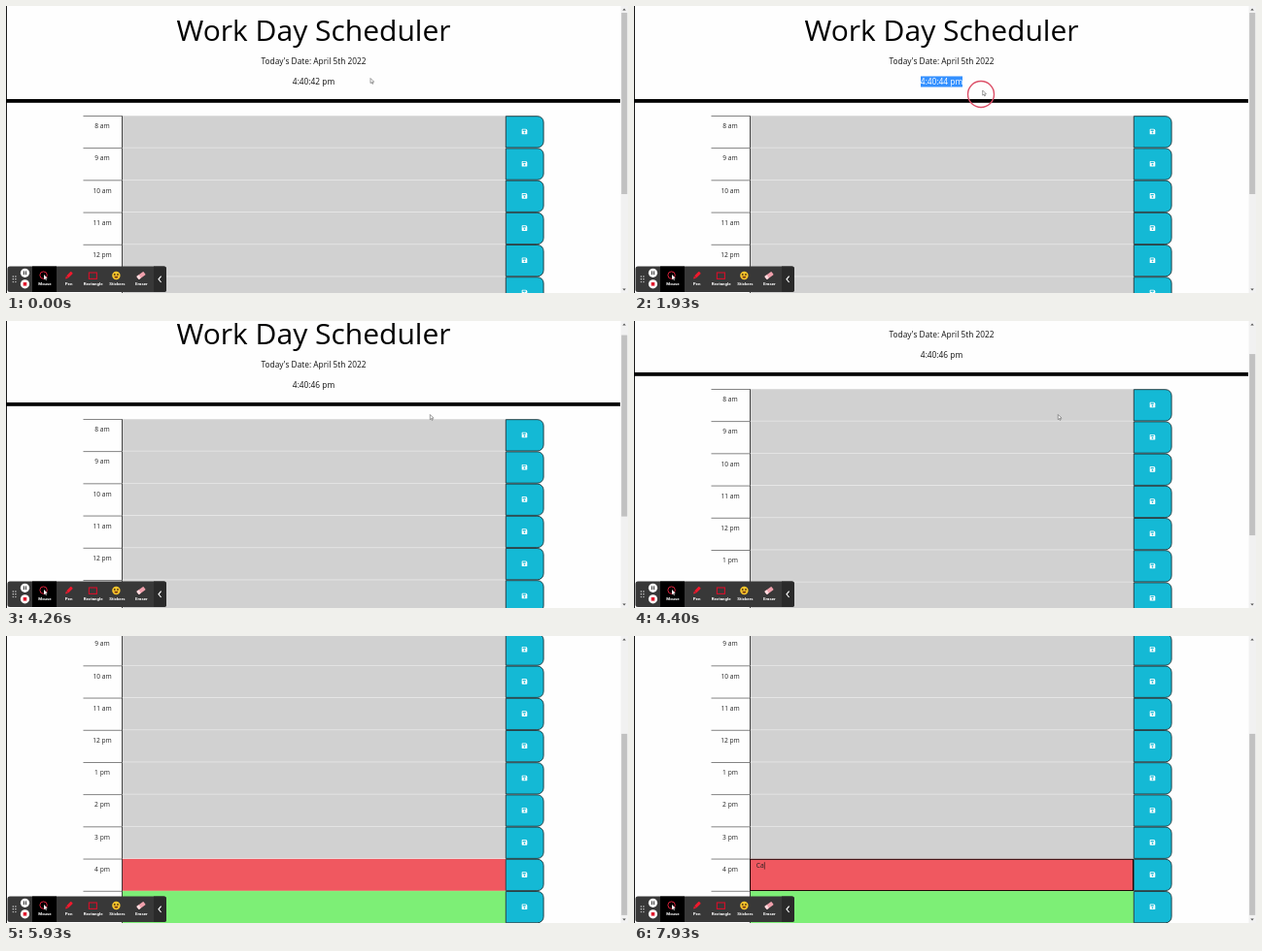
Animation of 640x296 px, one loop 8 s. Source, as an HTML page with a canvas:

```html
<!DOCTYPE html>
<html lang="en">
<head>
<meta charset="utf-8">
<title>Work Day Scheduler</title>
<style>
html, body { margin: 0; width: 100%; height: 100%; overflow: hidden; background: #fefefe; }
canvas { display: block; width: 640px; height: 296px; }
</style>
</head>
<body>
<canvas id="stage" width="640" height="296"></canvas>
<script>
const ctx = document.getElementById('stage').getContext('2d');
const LOOP = 8000, HOLD = 460, STEP = 66.7;
const ROW_TOP = 113.3, ROW_H = 33.2, MAX_SCROLL = 149;
const HOURS = ['8 am', '9 am', '10 am', '11 am', '12 pm', '1 pm', '2 pm', '3 pm', '4 pm', '5 pm'];
const CURRENT = 8;
const SANS = '"Open Sans", sans-serif';
const PRESS = 1630, RELEASE = 2200, FOCUS = 6800;

// Pointer stops: time, x, y
const POINTER = [
  [0, 375, 74.5], [460, 375, 74.5], [1330, 292, 79], [1630, 292, 79], [1900, 358.7, 87],
  [2330, 358.7, 87], [2800, 355.7, 80], [3130, 355.7, 80], [3900, 436.3, 96.5], [4990, 436.3, 96.5]
];

const smooth = u => {
  u = Math.min(1, Math.max(0, u));
  return u * u * (3 - 2 * u);
};

function rect(x, y, w, h, color) {
  ctx.fillStyle = color;
  ctx.fillRect(x, y, w, h);
}

function disc(x, y, r, color) {
  ctx.fillStyle = color;
  ctx.beginPath();
  ctx.arc(x, y, r, 0, Math.PI * 2);
  ctx.fill();
}

function ring(x, y, r, color, width) {
  ctx.strokeStyle = color;
  ctx.lineWidth = width;
  ctx.beginPath();
  ctx.arc(x, y, r, 0, Math.PI * 2);
  ctx.stroke();
}

function rounded(x, y, w, h, radii, fill, stroke, width = 1) {
  ctx.beginPath();
  ctx.roundRect(x, y, w, h, radii);
  if (fill) { ctx.fillStyle = fill; ctx.fill(); }
  if (stroke) { ctx.strokeStyle = stroke; ctx.lineWidth = width; ctx.stroke(); }
}

function poly(points, color) {
  ctx.fillStyle = color;
  ctx.beginPath();
  points.forEach(([x, y]) => ctx.lineTo(x, y));
  ctx.closePath();
  ctx.fill();
}

function text(str, x, y, size, color = '#111', align = 'center', family = SANS, weight = 400) {
  ctx.font = `${weight} ${size}px ${family}`;
  ctx.textAlign = align;
  ctx.fillStyle = color;
  ctx.fillText(str, x, y);
}

function tilted(x, y, angle, draw) {
  ctx.save();
  ctx.translate(x, y);
  ctx.rotate(angle);
  draw();
  ctx.restore();
}

function pointerAt(t) {
  for (let i = 1; i < POINTER.length; i++) {
    const [t0, x0, y0] = POINTER[i - 1], [t1, x1, y1] = POINTER[i];
    if (t <= t1) {
      const u = smooth((t - t0) / (t1 - t0));
      return [x0 + (x1 - x0) * u, y0 + (y1 - y0) * u];
    }
  }
  return null;
}

function arrow(x, y, scale, fill, line) {
  ctx.save();
  ctx.translate(x, y);
  ctx.scale(scale, scale);
  ctx.beginPath();
  [[0, 0], [0, 5.4], [1.3, 4.3], [2.1, 6.2], [3, 5.8], [2.2, 4], [3.9, 3.9]].forEach(([a, b]) => ctx.lineTo(a, b));
  ctx.closePath();
  ctx.fillStyle = fill;
  ctx.fill();
  if (line) {
    ctx.strokeStyle = line;
    ctx.lineWidth = 0.6;
    ctx.stroke();
  }
  ctx.restore();
}

function header(t, pointer) {
  text('Work Day Scheduler', 316.5, 36, 30, '#000');
  text("Today's Date: April 5th 2022", 316.5, 59.6, 8.33);

  const clock = `4:40:${42 + Math.floor((t + 400) / 1000)} pm`;
  text(clock, 316.5, 81.2, 8.33);
  if (t > PRESS && t < 2600) {
    const w = Math.min(43, Math.max(0, pointer[0] - 295));
    ctx.save();
    ctx.beginPath();
    ctx.rect(295, 72.3, w, 11.4);
    ctx.clip();
    rect(295, 72.3, w, 11.4, '#3390ff');
    text(clock, 316.5, 81.2, 8.33, '#fff');
    ctx.restore();
  } else if (t >= 2600 && t < 3600) {
    rect(316.8, 66, 1.6, 9.4, '#3a96e8');
  }
  rect(0, 96, 632, 3.8, '#000');
}

function saveIcon(x, y) {
  rounded(x - 2.8, y - 2.8, 5.6, 5.6, [0.6, 1.6, 0.6, 0.6], '#fff');
  rect(x - 1.9, y - 2, 3.2, 1.4, '#14b9d5');
  disc(x, y + 1, 0.9, '#14b9d5');
}

function entry(t, y) {
  ctx.strokeStyle = '#1a0808';
  ctx.lineWidth = 1;
  ctx.strokeRect(119.5, y + 0.4, 394, ROW_H - 1);
  const typed = 'Ca'.slice(0, t < 7600 ? 0 : t < 7850 ? 1 : 2);
  text(typed, 125.8, y + 9.4, 6.67, '#222', 'left');
  const blinkOn = typed || (t - FOCUS) % 1000 < 500;
  if (blinkOn) rect(126 + ctx.measureText(typed).width, y + 3.3, 0.6, 7.4, '#111');
}

function rows(t) {
  HOURS.forEach((hour, i) => {
    const y = ROW_TOP + i * ROW_H;
    const color = i < CURRENT ? '#d1d1d1' : i === CURRENT ? '#f05860' : '#7def76';
    rect(79.5, y - 0.3, 40, 0.9, '#777');
    text(hour, 99, y + 12.8, 6.67, '#222');
    rect(119, y, 395, ROW_H, color);
    if (i <= CURRENT) rect(119, y + ROW_H - 0.7, 395, 0.9, i < CURRENT ? '#ececec' : '#d8a078');
    rect(119, y, 0.9, ROW_H, '#333');
    rounded(514.3, y + 0.4, 38.8, ROW_H - 0.9, [0, 6.2, 6.2, 0], '#14b9d5', '#1d3438', 0.9);
    saveIcon(533.5, y + 16.2);
    if (i === CURRENT && t >= FOCUS) entry(t, y);
  });
}

function scrollbar(scroll) {
  rect(632.5, 0, 7.5, 296, '#f1f1f1');
  rect(633.2, 7 + scroll * 0.63, 6, 187, '#c1c1c1');
  poly([[634.4, 4.6], [637.8, 4.6], [636.1, 2.6]], '#505050');
  poly([[634.4, 291.4], [637.8, 291.4], [636.1, 293.4]], '#505050');
}

function toolbar() {
  rounded(1.5, 268.5, 163.5, 26.5, 2.5, '#383838');
  rounded(152, 268.5, 13, 26.5, [0, 2.5, 2.5, 0], '#2a2a2a');
  rect(27, 268.5, 25, 26.5, '#000');

  for (let i = 0; i < 6; i++) disc(7.3 + (i % 2) * 2.6, 279 + (i >> 1) * 2.8, 0.7, '#ddd');

  disc(19.5, 275.3, 4.6, '#fff');
  rect(18, 273.4, 1, 3.8, '#333');
  rect(20, 273.4, 1, 3.8, '#333');
  disc(19.5, 286.8, 4.6, '#fff');
  rect(17.7, 285, 3.6, 3.6, '#e0182d');

  ring(38.6, 277.6, 3.7, '#d8203a', 1);
  arrow(39, 277, 0.95, '#fff');

  tilted(64.6, 278, Math.PI / 4, () => {
    rounded(-1.5, -4.6, 3, 6.6, 0.6, '#f0192d');
    poly([[-1.5, 2.4], [1.5, 2.4], [0, 5]], '#f0192d');
  });

  ctx.strokeStyle = '#d5102a';
  ctx.lineWidth = 1.1;
  ctx.strokeRect(85.4, 275, 8, 6.4);

  disc(113.4, 278, 4.2, '#f8c62c');
  disc(111.8, 276.9, 0.9, '#4a3210');
  disc(115, 276.9, 0.9, '#4a3210');
  ctx.fillStyle = '#7a3b12';
  ctx.beginPath();
  ctx.arc(113.4, 278.8, 2, 0, Math.PI);
  ctx.fill();

  tilted(139, 278, -0.62, () => {
    rounded(-4.4, -2.1, 8.8, 4.2, 0.8, '#f0a0ac');
    rounded(-4.4, -2.1, 2.8, 4.2, 0.8, '#fbdde0');
  });

  [['Mouse', 40], ['Pen', 64.6], ['Rectangle', 89.6], ['Stickers', 114.4], ['Eraser', 139.4]]
    .forEach(([label, x]) => text(label, x, 288.4, 4.4, '#fff', 'center', 'Roboto, sans-serif', 700));

  ctx.strokeStyle = '#fff';
  ctx.lineWidth = 1.1;
  ctx.beginPath();
  ctx.moveTo(159.6, 278.6);
  ctx.lineTo(157, 281.8);
  ctx.lineTo(159.6, 285);
  ctx.stroke();
}

function draw(t) {
  const pointer = pointerAt(t);
  const scroll = Math.round(MAX_SCROLL * smooth((t - 4131) / 741));
  rect(0, 0, 640, 296, '#fefefe');
  ctx.save();
  ctx.translate(0, -scroll);
  header(t, pointer);
  rows(t);
  ctx.restore();
  rect(0, 0, 0.9, 296, '#000');
  scrollbar(scroll);
  toolbar();
  if (pointer) {
    const [x, y] = pointer;
    if (t > PRESS && t < RELEASE) ring(x - 1.7, y + 4, 13.5, '#dc5068', 1.4);
    arrow(x, y, 0.95, '#fff', '#555');
  }
}

function stepped(t) {
  return t < HOLD ? 0 : HOLD + Math.floor((t - HOLD + 5) / STEP) * STEP;
}

const start = performance.now();
function tick() {
  draw(stepped((performance.now() - start) % LOOP));
  requestAnimationFrame(tick);
}
tick();
</script>
</body>
</html>
```
